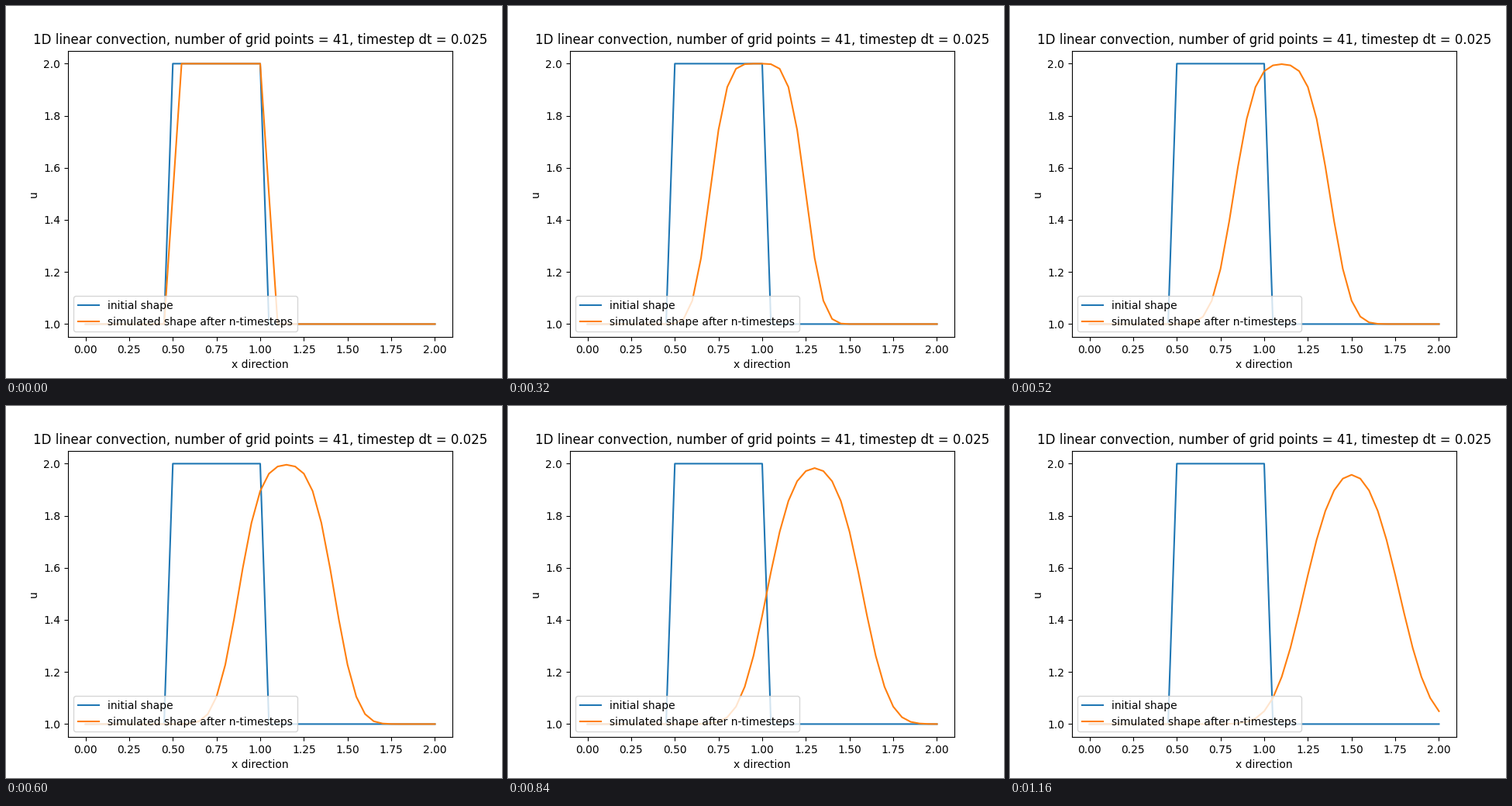
A matplotlib script that plays this animation: 640 by 480 pixels, repeating every 1200 ms.

```python
import numpy as np
import matplotlib.pyplot as plt
from matplotlib.animation import FuncAnimation

POINTS = 41
DT = 0.025
SPEED = 1.0
FRAMES = 30
INTERVAL = 40  # ms

x = np.linspace(0, 2, POINTS)
dx = x[1] - x[0]
index = np.arange(POINTS)
u_start = np.where((index >= 10) & (index <= 20), 2.0, 1.0)


def convect(u, steps):
    """Advance u with the first-order upwind scheme."""
    u = u.copy()
    for _ in range(steps):
        u[1:] -= SPEED * DT / dx * (u[1:] - u[:-1])
    return u


fig, ax = plt.subplots(figsize=(6.4, 4.8), dpi=100)
ax.plot(x, u_start, label="initial shape")
wave, = ax.plot(x, u_start, label="simulated shape after n-timesteps")
ax.set_title(f"1D linear convection, number of grid points = {POINTS}, "
             f"timestep dt = {DT}")
ax.set_xlabel("x direction")
ax.set_ylabel("u")
ax.legend(loc="lower left")


def update(frame):
    wave.set_ydata(convect(u_start, frame + 1))
    return wave,


anim = FuncAnimation(fig, update, frames=FRAMES, interval=INTERVAL,
                     repeat=True, repeat_delay=0)
plt.show()
```
